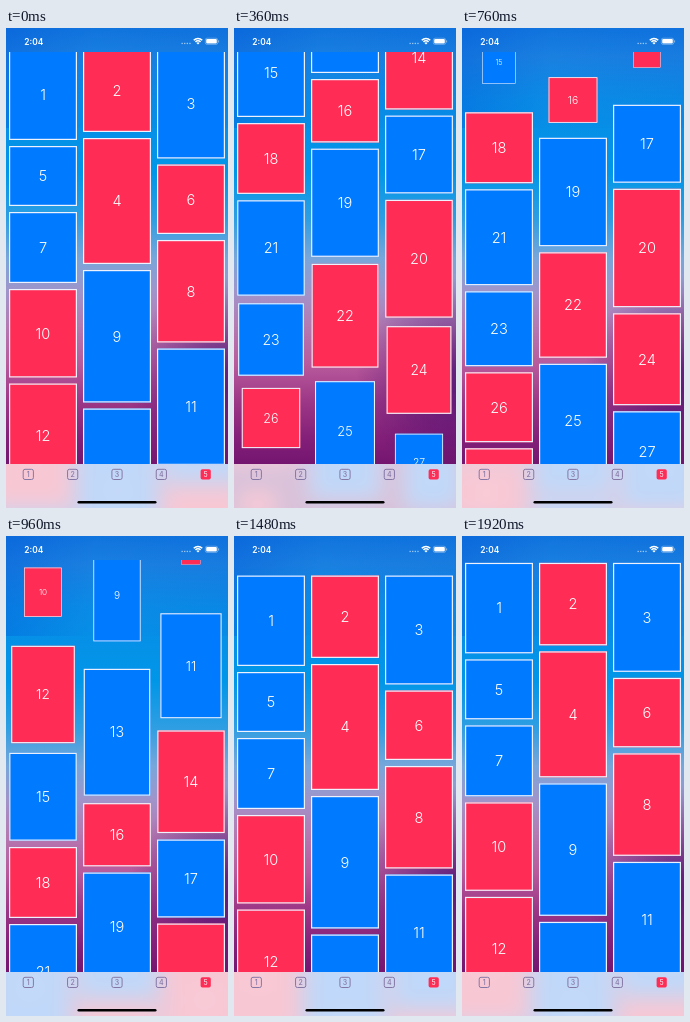
Write an HTML page with a canvas that moves like this. It is 222 px wide and 480 px high and loops after 1.96 s.

```html
<!DOCTYPE html>
<html lang="en">
<head>
<meta charset="utf-8">
<title>Card columns</title>
<style>
html, body { margin: 0; width: 100%; height: 100%; overflow: hidden; background: #0a6ad4; }
canvas { display: block; width: 222px; height: 480px; }
</style>
</head>
<body>
<canvas id="stage"></canvas>
<script>
const W = 222, H = 480, LOOP = 1960, STEP = 40;
const BLUE = '#007aff', RED = '#ff2d55';
const CLIP_TOP = 24, BAR_TOP = 436;
const FONT = 'Inter, Roboto, sans-serif';

const canvas = document.getElementById('stage');
const ctx = canvas.getContext('2d');
const dpr = window.devicePixelRatio || 1;
canvas.width = W * dpr;
canvas.height = H * dpr;
ctx.scale(dpr, dpr);

// Each column: card number, height
const columns = [
  [[1, 90.5], [5, 60], [7, 71], [10, 88.5], [12, 104], [15, 88.5], [18, 71],
   [21, 96], [23, 75], [26, 70], [28, 54], [31, 87], [33, 80]],
  [[2, 82.5], [4, 126], [9, 132.5], [13, 129.5], [16, 63.5], [19, 108.5],
   [22, 105.5], [25, 113.5], [29, 89], [32, 90]],
  [[3, 109], [6, 69.5], [8, 102.5], [11, 116.5], [14, 103.5], [17, 78],
   [20, 118.5], [24, 92], [27, 80], [30, 115], [34, 80]]
];
const CARD_W = 68, GAP = 6;
const cards = columns.flatMap((list, col) => {
  let top = 21.5;
  return list.map(([n, h]) => {
    const card = { n, h, top, cx: 37 + col * (CARD_W + GAP) };
    top += h + GAP;
    return card;
  });
});

// Scroll: flick up, drag back, flick down, bounce at the top edge
const TAU = 500, TOUCH = 545, RELEASE = 930, EDGE = 1272, REST = -5;
const glideUp = t => 906 * (1 - Math.exp(-t / TAU));
const glideDown = t => -297 + 546 * Math.exp((960 - t) / TAU);

function scrollAt(t) {
  if (t < TOUCH) return glideUp(Math.max(0, t));
  if (t < RELEASE) {
    const d = RELEASE - TOUCH, u = (t - TOUCH) / d;
    const a = glideUp(TOUCH), b = glideDown(RELEASE);
    const slope = -(b + 297) / TAU * d;
    return a + (b - a) * u * u * (3 - 2 * u) + slope * u * u * (u - 1);
  }
  if (t < EDGE) return glideDown(t);
  const s = t - EDGE;
  return REST - 0.585 * s * Math.exp(-0.01075 * s);
}

function visible(card, t) {
  const y = card.top - scrollAt(t);
  return y < H && y + card.h > CLIP_TOP;
}

// Cards spring from nothing to full size once they enter the view
function scaleAt(card, t) {
  for (let age = 0; age < 400; age += 2) {
    if (!visible(card, t - age)) {
      const x = 0.0275 * age;
      return 1 - (1 + x) * Math.exp(-x);
    }
  }
  return 1;
}

function gradient(x0, y0, x1, y1, stops) {
  const g = ctx.createLinearGradient(x0, y0, x1, y1);
  stops.forEach(([p, c]) => g.addColorStop(p, c));
  return g;
}

function label(text, x, y, size, weight, color) {
  ctx.font = `${weight} ${size}px ${FONT}`;
  ctx.textAlign = 'center';
  ctx.fillStyle = color;
  ctx.fillText(text, x, y + size * 0.364);
}

function roundRect(x, y, w, h, r) {
  ctx.beginPath();
  ctx.roundRect(x, y, w, h, r);
}

function drawBackground() {
  ctx.fillStyle = gradient(0, 0, 0, H, [
    [0, '#1074de'], [0.06, '#1a80e0'], [0.15, '#0a8ce6'], [0.3, '#0096e8'],
    [0.4, '#2f9ee2'], [0.48, '#78a6da'], [0.55, '#a094ca'], [0.62, '#b47ab2'],
    [0.7, '#b85a9c'], [0.78, '#9c3686'], [0.86, '#821e78'], [0.92, '#70146e'], [1, '#70146e']
  ]);
  ctx.fillRect(0, 0, W, H);
  ctx.fillStyle = gradient(0, 0, W, 0, [
    [0, 'rgba(0,80,215,.3)'], [0.4, 'rgba(0,80,215,0)'], [1, 'rgba(0,80,215,.08)']
  ]);
  ctx.fillRect(0, 0, W, 100);
  const shade = ctx.createRadialGradient(W, 350, 10, W, 350, 100);
  shade.addColorStop(0, 'rgba(60,8,110,.65)');
  shade.addColorStop(1, 'rgba(60,8,110,0)');
  ctx.fillStyle = shade;
  ctx.fillRect(0, 250, W, 200);
}

function drawCard(card, t, scroll) {
  if (!visible(card, t)) return;
  const s = scaleAt(card, t);
  if (s < 0.01) return;
  ctx.save();
  ctx.translate(card.cx, card.top + card.h / 2 - scroll);
  ctx.scale(s, s);
  ctx.fillStyle = card.n % 2 ? BLUE : RED;
  ctx.fillRect(-CARD_W / 2, -card.h / 2, CARD_W, card.h);
  ctx.strokeStyle = '#eef2ff';
  ctx.lineWidth = 1.2;
  ctx.strokeRect(-CARD_W / 2 + 0.6, -card.h / 2 + 0.6, CARD_W - 1.2, card.h - 1.2);
  label(card.n, 0, 0, 14.6, 300, '#fff');
  ctx.restore();
}

function drawStatus() {
  label('2:04', 27.8, 13.5, 8.4, 600, '#fff');
  ctx.fillStyle = 'rgba(255,255,255,.6)';
  for (let i = 0; i < 4; i++) ctx.fillRect(175.5 + i * 2.6, 14.8, 1.3, 1.3);

  ctx.strokeStyle = '#fff';
  ctx.lineWidth = 1.5;
  for (const r of [3.6, 6]) {
    ctx.beginPath();
    ctx.arc(192, 16.4, r, -Math.PI * 0.75, -Math.PI * 0.25);
    ctx.stroke();
  }
  ctx.fillStyle = '#fff';
  ctx.beginPath();
  ctx.moveTo(192, 16.6);
  ctx.arc(192, 16.6, 2.2, -Math.PI * 0.75, -Math.PI * 0.25);
  ctx.fill();

  ctx.strokeStyle = 'rgba(255,255,255,.5)';
  ctx.lineWidth = 0.6;
  roundRect(199.3, 10.2, 12.4, 6.3, 1.8);
  ctx.stroke();
  ctx.fillStyle = '#fff';
  roundRect(200.2, 11.1, 10.6, 4.5, 1);
  ctx.fill();
  ctx.fillStyle = 'rgba(255,255,255,.6)';
  ctx.fillRect(212.3, 12.4, 0.8, 2);
}

function drawTabs() {
  const pad = 20;
  ctx.save();
  ctx.beginPath();
  ctx.rect(0, BAR_TOP, W, H - BAR_TOP);
  ctx.clip();
  ctx.filter = `blur(${10 * dpr}px)`;
  ctx.drawImage(canvas, -pad, -pad, W + 2 * pad, H + 2 * pad);
  ctx.filter = 'none';
  ctx.fillStyle = 'rgba(246,243,248,.78)';
  ctx.fillRect(0, BAR_TOP, W, H - BAR_TOP);
  ctx.restore();

  for (let i = 0; i < 5; i++) {
    const x = 22.3 + i * 44.35, y = 446.4, active = i === 4;
    roundRect(x - 5.1, y - 5.1, 10.2, 10.2, 1.8);
    if (active) {
      ctx.fillStyle = RED;
      ctx.fill();
    } else {
      ctx.strokeStyle = '#8577a5';
      ctx.lineWidth = 1;
      ctx.stroke();
    }
    label(i + 1, x, y, 7, 500, active ? '#f5d9e6' : '#8577a5');
  }
  ctx.fillStyle = '#000';
  roundRect(71.5, 473, 79, 2.6, 1.3);
  ctx.fill();
}

function draw(t) {
  drawBackground();
  ctx.save();
  ctx.beginPath();
  ctx.rect(0, CLIP_TOP, W, H - CLIP_TOP);
  ctx.clip();
  const scroll = scrollAt(t);
  cards.forEach(card => drawCard(card, t, scroll));
  ctx.restore();
  drawStatus();
  drawTabs();
}

const start = performance.now();
function tick() {
  const t = (performance.now() - start) % LOOP;
  draw(Math.floor(t / STEP) * STEP);
  requestAnimationFrame(tick);
}
tick();
</script>
</body>
</html>
```
